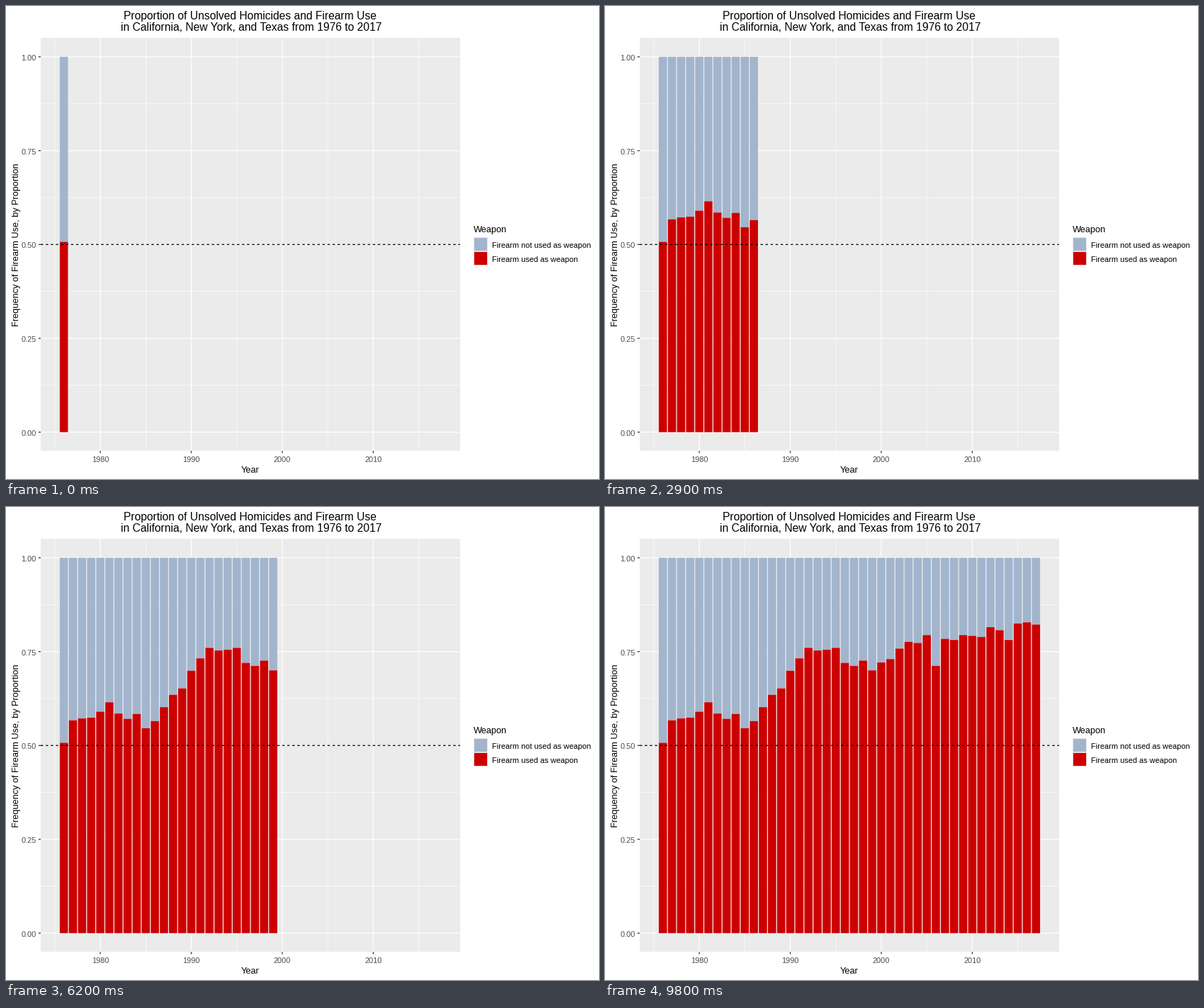
A matplotlib script that plays this animation: 837x669 px, repeating every 10000 ms.

```python
import matplotlib.pyplot as plt
from matplotlib.animation import FuncAnimation
from matplotlib.patches import Rectangle

W, H, DPI = 837, 669, 72  # at 72 dpi one point is one pixel
LEFT, RIGHT, TOP, BOTTOM = 49, 641, 45.3, 629.3
RED, BLUE = "#CD0000", "#A2B5CD"
TICK, TICK_TEXT = "#333333", "#4D4D4D"
MAJOR, MINOR = 1.26, 0.63
DASH = 3.55
FIRST_YEAR, BAR_WIDTH = 1976, 0.9
STEP_MS, LOOP_MS = 100, 10000

# Share of unsolved homicides with a firearm, one value per year
SHARES = [
    .507, .567, .572, .574, .590, .615, .585, .571, .584, .546, .565,
    .602, .635, .652, .699, .732, .760, .753, .755, .760, .720, .712,
    .726, .700, .721, .730, .758, .776, .773, .794, .712, .784, .781,
    .794, .792, .789, .815, .807, .781, .825, .828, .822,
]

plt.rcParams["font.family"] = "Liberation Sans"

fig = plt.figure(figsize=(W / DPI, H / DPI), dpi=DPI, facecolor="white")
ax = fig.add_axes([0, 0, 1, 1])
ax.set_xlim(0, W)
ax.set_ylim(H, 0)
ax.axis("off")


def year_x(year):
    return LEFT + (year - 1973.455) * (RIGHT - LEFT) / 46.09


def share_y(share):
    return BOTTOM - (share + 0.05) * (BOTTOM - TOP) / 1.1


def box(x0, y0, x1, y1, color, z=1):
    return ax.add_patch(Rectangle((x0, y0), x1 - x0, y1 - y0, fc=color,
                                  lw=0, snap=False, zorder=z))


def hline(y, x0, x1, color, width=MAJOR, z=1):
    box(x0, y - width / 2, x1, y + width / 2, color, z)


def vline(x, y0, y1, color, width=MAJOR):
    box(x - width / 2, y0, x + width / 2, y1, color)


def label(x, y, text, size, color="black", **kw):
    ax.text(x, y, text, fontsize=size, color=color, va="baseline", **kw)


def draw_panel():
    box(LEFT, round(TOP), RIGHT, round(BOTTOM), "#EBEBEB")
    for k in range(9):
        hline(share_y(k / 8), LEFT, RIGHT, "white", MINOR if k % 2 else MAJOR)
    for year in range(1975, 2020, 5):
        vline(year_x(year), TOP, BOTTOM, "white", MINOR if year % 10 else MAJOR)
    for k in range(5):
        y = share_y(k / 4)
        hline(y, LEFT - 3.2, LEFT, TICK)
        label(43, y + 5, f"{k / 4:.2f}", 11, TICK_TEXT, ha="right")
    for year in range(1980, 2011, 10):
        x = year_x(year)
        vline(x, BOTTOM, BOTTOM + 3.2, TICK)
        label(x, 645, str(year), 11, TICK_TEXT, ha="center")
    x = LEFT
    while x < RIGHT:
        hline(share_y(0.5), x, min(x + DASH, RIGHT), "black", z=3)
        x += 2 * DASH


def draw_titles():
    label(344, 19, "Proportion of Unsolved Homicides and Firearm Use", 15.6,
          ha="center")
    label(345.7, 35, "in California, New York, and Texas from 1976 to 2017",
          15.6, ha="center")
    label(345, 660, "Year", 12.8, ha="center")
    label(18, 338, "Frequency of Firearm Use, by Proportion", 12.8,
          rotation=90, rotation_mode="anchor", ha="center")


def draw_legend():
    x, y, key, inset = 660, 327, 20, 0.85
    label(x, 320, "Weapon", 12.8)
    entries = [(BLUE, "Firearm not used as weapon"),
               (RED, "Firearm used as weapon")]
    for color, text in entries:
        box(x, y, x + key, y + key, "#F2F2F2")
        box(x + inset, y + inset, x + key - inset, y + key - inset, color)
        label(x + 26, y + 15, text, 10.95)
        y += key


def make_bar(year, share):
    x0, x1 = year_x(year - BAR_WIDTH / 2), year_x(year + BAR_WIDTH / 2)
    split = share_y(share)
    return (box(x0, share_y(1), x1, split, BLUE, z=2),
            box(x0, split, x1, share_y(0), RED, z=2))


def bars_shown(t):
    """Bars arrive every 300 ms, then every 200 ms from 5 s on."""
    if t < 5000:
        return 1 + (t + 100) // 300
    return 18 + (t - 5000) // 200


draw_panel()
draw_titles()
draw_legend()
bars = [make_bar(FIRST_YEAR + i, s) for i, s in enumerate(SHARES)]


def update(frame):
    count = bars_shown(frame * STEP_MS)
    for i, pair in enumerate(bars):
        for part in pair:
            part.set_visible(i < count)
    return [part for pair in bars for part in pair]


anim = FuncAnimation(fig, update, frames=LOOP_MS // STEP_MS, interval=STEP_MS,
                     init_func=lambda: update(0), repeat=True, repeat_delay=0)
plt.show()
```
